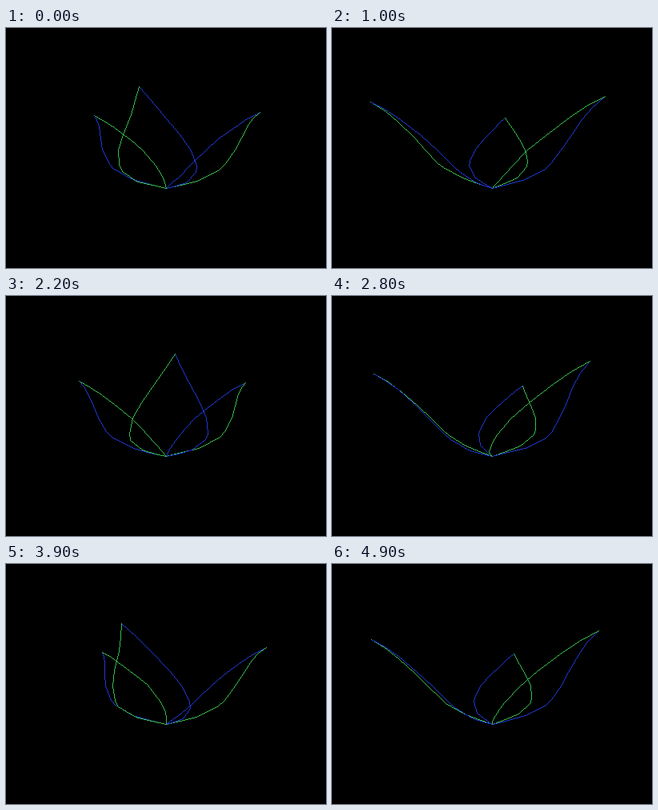
These frames come from a looping animation (400 px wide and 300 px high, 5000 ms). An HTML page with a canvas:

```html
<!DOCTYPE html>
<html lang="en">
<head>
<meta charset="utf-8">
<title>Turning petals</title>
<style>
  html, body { margin: 0; width: 100%; height: 100%; overflow: hidden; background: #000; }
  canvas { display: block; width: 400px; height: 300px; }
</style>
</head>
<body>
<canvas id="stage" width="400" height="300"></canvas>
<script>
const ctx = document.getElementById('stage').getContext('2d');
const BLUE = '#2038d0', GREEN = '#38b84c';
const STEP = 100, STEPS = 50;
const FOCAL = 400, DIST = 4;

// One petal edge from base to tip: x, height, z. The other edge swaps x and z.
const EDGE = [
  [0, -.5, 0], [.2, -.455, 0], [.415, -.395, .01], [.66, -.26, .08],
  [.72, -.19, .13], [.804, -.024, .275], [.85, .128, .45],
  [.895, .305, .686], [.94, .41, .84], [1, .5, 1]
];

function project([x, y, z], angle) {
  const s = Math.sin(angle), c = Math.cos(angle);
  const near = 1 / (DIST - (z * c - x * s));
  return {
    x: Math.floor(200 + FOCAL * (x * c + z * s) * near),
    y: Math.floor(150 - FOCAL * y * near),
    near
  };
}

// Adds the unsmoothed pixels of a line, each with its depth.
function addLine(dots, a, b, color) {
  const n = Math.max(Math.abs(b.x - a.x), Math.abs(b.y - a.y), 1);
  for (let i = 0; i <= n; i++) {
    const t = i / n;
    dots.push({
      x: Math.round(a.x + (b.x - a.x) * t),
      y: Math.round(a.y + (b.y - a.y) * t),
      near: a.near + (b.near - a.near) * t,
      color
    });
  }
}

function addEdge(dots, points, angle, color) {
  const path = points.map(p => project(p, angle));
  for (let i = 1; i < path.length; i++) addLine(dots, path[i - 1], path[i], color);
}

const blueEdge = EDGE;
const greenEdge = EDGE.map(([x, y, z]) => [z, y, x]);

function draw(step) {
  const dots = [];
  for (let petal = 0; petal < 3; petal++) {
    // The tip lies on the diagonal, 45 degrees from the z axis.
    const angle = (6 * step - 9 - 45 + 120 * petal) * Math.PI / 180;
    addEdge(dots, blueEdge, angle, BLUE);
    addEdge(dots, greenEdge, angle, GREEN);
  }
  dots.sort((a, b) => a.near - b.near);
  ctx.fillStyle = '#000';
  ctx.fillRect(0, 0, 400, 300);
  for (const d of dots) {
    ctx.fillStyle = d.color;
    ctx.fillRect(d.x, d.y, 1, 1);
  }
}

const start = performance.now();
let last = 0;
function tick() {
  const step = Math.floor((performance.now() - start) / STEP) % STEPS;
  if (step !== last) draw(last = step);
  requestAnimationFrame(tick);
}
draw(0);
requestAnimationFrame(tick);
</script>
</body>
</html>
```
